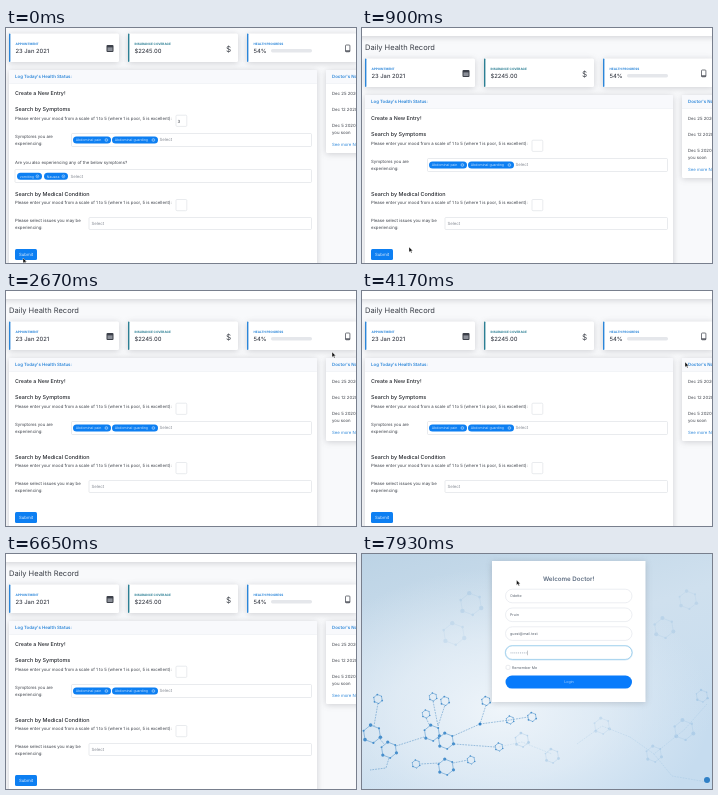
An HTML page that plays this animation: 350 by 235 pixels, repeating every 8000 ms.

```html
<!DOCTYPE html>
<html lang="en">
<head>
<meta charset="utf-8">
<style>
  html, body { margin: 0; width: 100%; height: 100%; overflow: hidden; background: #f8f9fb; }
  svg { display: block; font: 4.3px Inter, sans-serif; fill: #3c4049; text-rendering: geometricPrecision; }
  .card { fill: #fff; filter: drop-shadow(0 1.5px 3px #3a3b4538); }
  .h { font-weight: 500; fill: #25282e; }
  .blue { font-weight: 600; font-size: 4.4px; fill: #2b86d9; }
  .label { font-weight: 700; font-size: 3.1px; }
  .value { font-weight: 500; font-size: 5.8px; fill: #3a3e48; }
  .box { fill: #fff; stroke: #dadde2; stroke-width: .6; }
  .tag { fill: #0d7ff2; }
  .tagtext { font-size: 3.5px; fill: #c4dffa; }
  .muted { fill: #858a93; }
  .white { fill: #e2effd; }
  .small { font-size: 3.65px; fill: #5b6470; }
</style>
</head>
<body>
<svg id="stage" width="350" height="235" viewBox="0 0 350 235"></svg>
<script>
const text = (x, y, s, cls = '', more = '') => `<text x="${x}" y="${y}" class="${cls}" ${more}>${s}</text>`;
const rect = (x, y, w, h, cls = '', more = '') =>
  `<rect x="${x}" y="${y}" width="${w}" height="${h}" class="${cls}" ${more}/>`;
const size = px => `style="font-size:${px}px"`;

const statCard = (x, color, label, value) =>
  rect(x, 30.5, 110, 28.5, 'card', 'rx="1.5"') +
  rect(x, 30.5, 1.4, 28.5, '', `rx=".7" fill="${color}"`) +
  text(x + 6.5, 42.4, label, 'label', `fill="${color}"`) +
  text(x + 6.5, 50.2, value, 'value');

const tag = (x, y, w, s) =>
  rect(x, y, w, 7, 'tag', 'rx="3.5"') + text(x + 2.8, y + 4.7, s, 'tagtext') +
  `<circle cx="${x + w - 4.6}" cy="${y + 3.5}" r="1.4" fill="none" stroke="#d5e8fb" stroke-width=".5"/>` +
  `<path d="m${x + w - 5.1} ${y + 3}l1 1m0-1l-1 1" stroke="#d5e8fb" stroke-width=".4"/>`;

const moodRow = (y, title) =>
  text(9, y, title, 'h', size(5.45)) +
  text(9, y + 8.2, 'Please enter your mood from a scale of 1 to 5 (where 1 is poor, 5 is excellent):') +
  rect(170, y + 3.8, 10.8, 11.2, 'box', 'rx="1"');

// Everything above the medical section; it scrolls when the extra question disappears.
const upper =
  rect(-5, -30, 360, 38, 'card') +
  text(3, 21.7, 'Daily Health Record', '', size(7.5)) +
  statCard(3, '#2b86d9', 'APPOINTMENT', '23 Jan 2021') +
  statCard(122, '#2c7f94', 'INSURANCE COVERAGE', '$2245.00') +
  statCard(241, '#2b86d9', 'HEALTH PROGRESS', '54%') +
  rect(265, 46, 41, 3.4, '', 'rx="1.6" fill="#e5e7eb"') +
  rect(100.5, 42, 7, 7, '', 'rx="1"') + rect(101.5, 44.4, 5, 3.6, '', 'fill="#8b8f98"') +
  text(220, 48.8, '$', '', size(8)) +
  rect(339.5, 42, 4.4, 6.8, '', 'rx=".8" style="fill:none;stroke:#3c4049;stroke-width:.7"') +
  rect(339.5, 47.4, 4.4, 1.2) +
  rect(3, 67, 308, 200, 'card', 'rx="1.5"') +
  rect(3, 67, 308, 13.5, '', 'rx="1.5" fill="#f8f9fc"') + rect(3, 80.3, 308, .5, '', 'fill="#e9ebf0"') +
  text(9, 75.4, "Log Today's Health Status:", 'blue') +
  text(9, 92.2, 'Create a New Entry!', 'h', size(5.3)) +
  moodRow(108.4, 'Search by Symptoms') +
  text(9, 135.3, 'Symptoms you are') + text(9, 142.3, 'experiencing:') +
  rect(65.5, 130.5, 240, 13, 'box', 'rx="1"') +
  tag(67, 133.5, 38, 'Abdominal pain') + tag(106, 133.5, 46, 'Abdominal guarding') +
  text(153.5, 138.4, 'Select', 'muted') +
  rect(320, 67, 40, 83, 'card', 'rx="1.5"') +
  rect(320, 67, 40, 13.5, '', 'fill="#f8f9fc"') + rect(320, 80.3, 40, .5, '', 'fill="#e9ebf0"') +
  text(326, 75.4, "Doctor's Notes", 'blue') +
  text(326, 92.3, 'Dec 25 2020') + text(326, 108.3, 'Dec 12 2020') +
  text(326, 124.3, 'Dec 5 2020 - see') + text(326, 131, 'you soon') +
  text(326, 142.6, 'See more Notes', '', 'style="fill:#2b86d9"');

const extra =
  text(171.5, 94.5, '3') +
  text(9, 135.7, 'Are you also experiencing any of the below symptoms?') +
  rect(9, 141.5, 296.5, 13, 'box', 'rx="1"') +
  tag(11, 144.8, 25, 'vomiting') + tag(38, 144.8, 24, 'Nausea') +
  text(64.5, 149.7, 'Select', 'muted');

const lower =
  moodRow(167.7, 'Search by Medical Condition') +
  text(9, 194.2, 'Please select issues you may be') + text(9, 201, 'experiencing:') +
  rect(83, 189.5, 222.5, 12, 'box', 'rx="1"') + text(85.5, 197.2, 'Select', 'muted') +
  rect(9, 221, 22, 11, 'tag', 'rx="1.5"') + text(13, 228.1, 'Submit', 'white');

// Molecule backdrop
const dot = (x, y, r) => `<circle cx="${x}" cy="${y}" r="${r}"/>`;
function hex(x, y, r, opacity = .85) {
  const pts = [...Array(6)].map((_, i) => {
    const a = (i + .35) * Math.PI / 3;
    return [x + r * Math.cos(a), y + r * Math.sin(a)];
  });
  return `<g opacity="${opacity}" fill="#2f80c6"><polygon points="${pts.join(' ')}" fill="none" stroke="#5b9acf" stroke-width=".7"/>` +
    pts.map((p, i) => dot(...p, r * (i % 2 ? .12 : .2))).join('') + '</g>';
}
const bond = (d, opacity = .8) =>
  `<path d="${d}" fill="none" stroke="#5b96c8" stroke-width=".7" stroke-dasharray="1.8 1" opacity="${opacity}"/>`;

const backdrop =
  rect(0, 0, 350, 235, '', 'fill="url(#sky)"') + rect(0, 0, 350, 235, '', 'fill="url(#glow)"') +
  bond('M16 149L12 172M18 185L22 190M34 192L62 183M64 164L68 172M71 147L76 172L83 151M91 182L118 170L124 151M118 170L148 166L166 163M91 209L106 206M92 190L133 193M78 209L58 210M27 204L24 214L8 216') +
  bond('M137 193L160 188L190 200M215 190L240 172L268 183M268 183L292 200L322 176L345 150M292 200L310 222L345 228', .2) +
  hex(10, 180, 9) + hex(27, 196, 8) + hex(70, 179, 8) + hex(84, 187, 8) + hex(84, 213, 8) +
  hex(16, 145, 4.5) + hex(71, 143, 4) + hex(64, 160, 4) + hex(83, 147, 4.5) + hex(124, 147, 4.5) +
  hex(148, 166, 4) + hex(170, 163, 4.5) + hex(109, 206, 4) + hex(137, 193, 4) + hex(54, 210, 4) +
  hex(160, 186, 7, .25) + hex(190, 202, 7, .2) + hex(240, 172, 8, .14) + hex(322, 176, 10, .16) +
  hex(292, 200, 8, .16) + hex(340, 142, 6, .2) + hex(109, 50, 11, .12) + hex(92, 80, 11, .1) +
  hex(302, 74, 10, .12) + hex(326, 46, 9, .1) +
  `<g fill="#2f80c6">${dot(118, 170, 1.5)}${dot(345, 226, 3)}</g>`;

const input = (y, s, stroke = '#dfe3e9') =>
  rect(143.5, y, 126.5, 13.6, '', `rx="6.8" fill="#fff" stroke="${stroke}" stroke-width=".6"`) +
  text(148, y + 8.1, s, 'small');

const login = backdrop +
  rect(130, 7, 153.5, 141, 'card') +
  text(206.7, 26.6, 'Welcome Doctor!', '', 'text-anchor="middle" style="font-size:6.2px;font-weight:600;fill:#5f6e82"') +
  input(35.2, 'Odette') + input(54, 'Pruin') + input(72.8, 'guest@mail.test') +
  rect(143.5, 91.8, 126.5, 13.8, '', 'rx="6.9" fill="none" stroke="#d6eaf8" stroke-width="1.8"') +
  input(91.8, '', '#78bce4') +
  `<path d="M148.5 98.9H165" stroke="#98a5b3" stroke-dasharray="1 .9" stroke-width=".8"/>` +
  rect(165.6, 96.6, .3, 4.6) +
  rect(144, 111.4, 4, 4, 'box', 'rx="1.2"') + text(150, 114.8, 'Remember Me', 'small') +
  rect(143.5, 121.6, 126.5, 13, '', 'rx="6.5" fill="#087bfb"') +
  text(207, 129.3, 'Login', '', 'text-anchor="middle" style="font-size:3.7px;fill:#a9d0fb"');

stage.innerHTML = `
  <defs>
    <linearGradient id="sky" x2=".5" y2="1">
      <stop stop-color="#bcd3e5"/><stop offset=".5" stop-color="#cfe0ee"/><stop offset="1" stop-color="#c6dcef"/>
    </linearGradient>
    <radialGradient id="glow" cx=".4" cy=".66" r=".6">
      <stop stop-color="#eff5fa"/><stop offset=".5" stop-color="#e6eff7" stop-opacity=".7"/>
      <stop offset="1" stop-color="#dfebf5" stop-opacity="0"/>
    </radialGradient>
  </defs>
  <g id="record"><g id="top">${upper}</g><g id="more">${extra}</g>${lower}</g>
  <g id="welcome">${login}</g>
  <path id="pointer" d="M0 0V5.2L1.3 4.1L2.2 6L3.1 5.6L2.2 3.8H3.8Z" fill="#111" stroke="#fff" stroke-width=".4"/>`;

const [record, topPart, more, welcome, pointer] =
  ['record', 'top', 'more', 'welcome', 'pointer'].map(id => document.getElementById(id));

const LOOP = 8000, SUBMIT = 70, LOGIN = 6910;
// Pointer stops: time, x, y
const path = [
  [0, 17, 230], [300, 17, 230], [830, 47, 219], [900, 47, 219], [1170, 22, 227], [1650, 22, 227],
  [1850, 259, 146], [2250, 259, 146], [2530, 326, 61], [2870, 326, 61], [3360, 300, 88], [3900, 300, 88],
  [4170, 323, 71], [4450, 318, 70], [4660, 321, 110], [4800, 321, 111], [4870, 328, 117], [5400, 328, 117],
  [5670, 316, 68], [5940, 316, 68], [6080, 167, 8], [6220, 167, 8], [6500, 150, -8],
  [7680, 288, -8], [7930, 154.5, 26], [LOOP, 154.5, 26]
];

function pointerAt(t) {
  const i = path.findIndex(p => p[0] > t);
  const [t0, x0, y0] = path[i - 1], [t1, x1, y1] = path[i];
  const u = (t - t0) / (t1 - t0), e = u * u * (3 - 2 * u);
  return [x0 + (x1 - x0) * e, y0 + (y1 - y0) * e];
}

function draw() {
  const t = performance.now() % LOOP;
  const submitted = t >= SUBMIT, atLogin = t >= LOGIN;
  record.style.display = atLogin ? 'none' : '';
  welcome.style.display = atLogin ? '' : 'none';
  more.style.display = submitted ? 'none' : '';
  topPart.setAttribute('transform', `translate(0 ${submitted ? 0 : -25})`);
  pointer.setAttribute('transform', `translate(${pointerAt(t)})`);
  requestAnimationFrame(draw);
}
draw();
</script>
</body>
</html>
```
